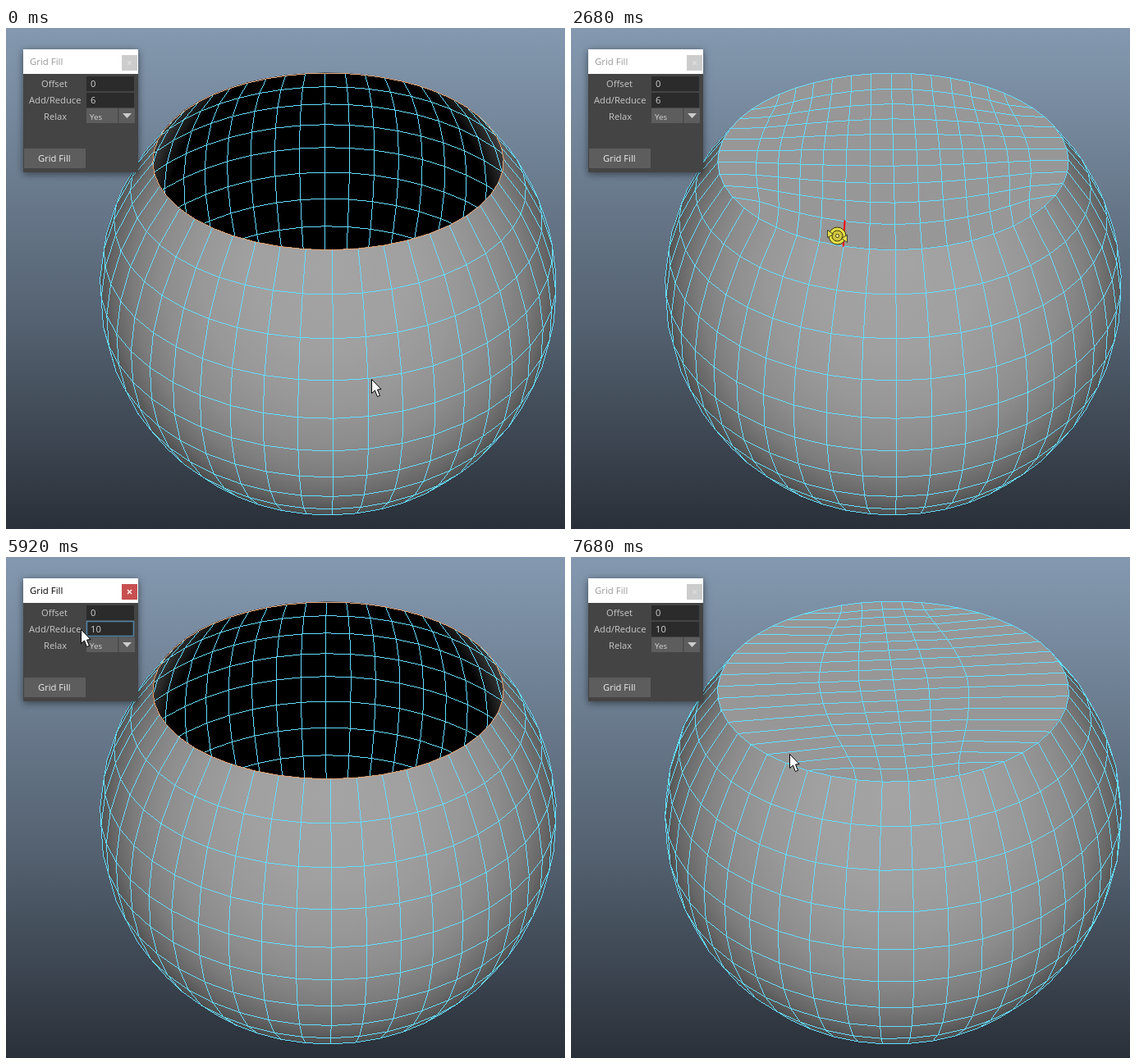
Recreate the animation shown at these times as an HTML page with a canvas. Size 681 px wide and 611 px high, loop 8000 ms.

```html
<!DOCTYPE html>
<html lang="en">
<head>
<meta charset="utf-8">
<title>Grid fill</title>
<style>
html, body { margin: 0; width: 100%; height: 100%; overflow: hidden; background: #444 }
canvas { display: block }
</style>
</head>
<body>
<canvas id="stage" width="681" height="611"></canvas>
<script>
const g = document.getElementById('stage').getContext('2d');
const LOOP = 8000, RAD = Math.PI / 180;
const CX = 392, CY = 316, FOCAL = 1243, DIST = 4.58;   // perspective camera
const LONS = 48, LATS = 15, RIM = 45;
const CYAN = '#64dcff';
const FONT = '"Open Sans", "Noto Sans", sans-serif';

// Mouse moves: start, end, steps, control point, end point
const moves = [
  [80, 360, 4, 260, 250, 72, 146],
  [540, 540, 1, 72, 150, 73, 158],
  [1100, 1560, 6, 230, 400, 341, 170],
  [1660, 1940, 4, 557, 390, 330, 254],
  [2120, 2680, 7, 390, 252, 324, 251],
  [3330, 3600, 4, 230, 200, 136, 90],
  [4073, 4440, 5, 112, 90, 91, 88],
  [6013, 6300, 4, 85, 125, 79, 156],
  [6840, 7117, 4, 170, 190, 240, 235],
  [7210, 7580, 5, 253, 237, 266, 240]
];

const within = (t, ...spans) => spans.some(([a, b]) => t >= a && t < b);
const mix = (a, b, f) => a + (b - a) * f;
const mixPoints = (p, q, f) => p.map((v, c) => mix(v, q[c], f));

// Eased progress that advances in n hard steps between two times
function progress(t, start, end, n) {
  if (t < start) return 0;
  const gap = (end - start) / (n - 1) || 1;
  const f = Math.min(n, Math.floor((t - start + 1) / gap) + 1) / n;
  return f * f * (3 - 2 * f);
}

function mouseAt(t) {
  let at = [445, 428];
  for (const [start, end, n, cx, cy, ex, ey] of moves) {
    const f = progress(t, start, end, n), via = [cx, cy];
    at = mixPoints(mixPoints(at, via, f), mixPoints(via, [ex, ey], f), f);
  }
  return at;
}

function onSphere(lat, lon) {
  const r = Math.cos(lat * RAD);
  return [r * Math.sin(lon * RAD), Math.sin(lat * RAD), r * Math.cos(lon * RAD)];
}

// Quad grid inside the rim: a blend of front-to-back and side-to-side spans
function makeCap(add) {
  const cols = 26 - 2 * add, rows = 2 * add - 2;
  const rim = k => onSphere(RIM, k * 360 / LONS);
  const nearness = (i, n) => 1 - Math.abs(2 * i / n - 1);
  const grid = [];
  for (let j = 0; j <= rows; j++) {
    grid[j] = [];
    for (let i = 0; i <= cols; i++) {
      const k = i - cols / 2, side = cols / 2 + rows - j;
      const column = mixPoints(rim(LONS / 2 - k), rim(k), j / rows);
      const row = mixPoints(rim(-side), rim(side), i / cols);
      const u = nearness(i, cols), v = nearness(j, rows);
      grid[j][i] = !u ? row : !v ? column : mixPoints(column, row, .55 * v / (u + v));
    }
  }
  return grid;
}
const caps = { 6: makeCap(6), 10: makeCap(10) };

function projector(yaw, tilt) {
  const cy = Math.cos(yaw * RAD), sy = Math.sin(yaw * RAD);
  const ct = Math.cos(tilt * RAD), st = Math.sin(tilt * RAD);
  return ([x, y, z]) => {
    const px = x * cy + z * sy, pz = z * cy - x * sy;
    const s = FOCAL / (DIST - y * st - pz * ct);
    return [CX + px * s, CY - (y * ct - pz * st) * s];
  };
}

function polygon(points, path = new Path2D()) {
  points.forEach(([x, y], i) => i ? path.lineTo(x, y) : path.moveTo(x, y));
  path.closePath();
  return path;
}

function stroke(path, color, width = 1) {
  g.strokeStyle = color;
  g.lineWidth = width;
  g.stroke(path);
}

// One-pixel line without smoothing, drawn as straight runs
function pixelLine(a, b) {
  const flat = Math.abs(b[0] - a[0]) >= Math.abs(b[1] - a[1]);
  const m = flat ? 0 : 1;
  if (a[m] > b[m]) [a, b] = [b, a];
  const from = Math.round(a[m]), to = Math.round(b[m]);
  const slope = (b[1 - m] - a[1 - m]) / (b[m] - a[m] || 1);
  const level = p => Math.round(a[1 - m] + (p - a[m]) * slope);
  for (let start = from, p = from + 1; p <= to + 1; p++) {
    const cross = level(start);
    if (p <= to && level(p) == cross) continue;
    if (flat) g.fillRect(start, cross, p - start, 1);
    else g.fillRect(cross, start, 1, p - start);
    start = p;
  }
}

function outline(points, color) {
  g.fillStyle = color;
  points.forEach((p, i) => pixelLine(p, points[(i + 1) % points.length]));
}

function gradient(grad, stops) {
  for (const [at, color] of stops) grad.addColorStop(at, color);
  return grad;
}
const grey = v => `rgb(${v},${v},${v})`;
const skyFill = gradient(g.createLinearGradient(0, 0, 0, 611),
  [[0, '#8499b0'], [.6, '#53606f'], [1, '#2a3039']]);
const bodyFill = gradient(g.createRadialGradient(396, 288, 0, 394, 312, 284),
  [[0, 164], [.35, 160], [.55, 152], [.72, 140], [.84, 124], [.93, 102], [1, 74]].map(([a, v]) => [a, grey(v)]));
const holeFill = gradient(g.createRadialGradient(392, 235, 0, 392, 235, 234),
  [[0, '#000'], [.84, '#000'], [1, '#484848']]);

function segmentDistance([px, py], [ax, ay], [bx, by]) {
  const dx = bx - ax, dy = by - ay;
  const f = Math.max(0, Math.min(1, ((px - ax) * dx + (py - ay) * dy) / (dx * dx + dy * dy)));
  return Math.hypot(px - ax - f * dx, py - ay - f * dy);
}

function drawCap(cap, project, mouse) {
  const grid = cap.map(row => row.map(project));
  let best = 14, hot = null;
  const edge = (a, b) => {
    pixelLine(a, b);
    const d = mouse ? segmentDistance(mouse, a, b) : 99;
    if (d < best) { best = d; hot = [a, b]; }
  };
  g.fillStyle = CYAN;
  grid.forEach((row, j) => row.forEach((p, i) => {
    if (i) edge(row[i - 1], p);
    if (j) edge(grid[j - 1][i], p);
  }));
  if (hot) stroke(polygon(hot), '#f00', 2);
}

function drawMesh(project, cap, mouse) {
  const rings = [];
  for (let a = 0; a <= LATS; a++) {
    rings[a] = [];
    for (let b = 0; b < LONS; b++) rings[a][b] = project(onSphere(RIM - 9 * a, b * 360 / LONS));
  }
  const front = [], back = [], body = new Path2D();
  for (let a = 0; a < LATS; a++) {
    for (let b = 0; b < LONS; b++) {
      const n = (b + 1) % LONS;
      const q = [rings[a][b], rings[a][n], rings[a + 1][n], rings[a + 1][b]];
      const area = (q[2][0] - q[0][0]) * (q[3][1] - q[1][1]) - (q[2][1] - q[0][1]) * (q[3][0] - q[1][0]);
      (area > 0 ? front : back).push(q);
    }
  }
  front.forEach(q => polygon(q, body));
  const rim = polygon(rings[0]);
  g.fillStyle = bodyFill;
  g.fill(body);
  g.fillStyle = cap ? '#979797' : holeFill;
  g.fill(rim);
  if (!cap) {
    g.save();
    g.clip(rim);
    back.forEach(q => outline(q, CYAN));
    g.restore();
  }
  front.forEach(q => outline(q, CYAN));
  if (cap) drawCap(cap, project, mouse);
  else outline(rings[0], '#e2a170');
}

function box(x, y, w, h, color) {
  g.fillStyle = color;
  g.fillRect(x, y, w, h);
}

function text(str, x, y, color = '#c8c8c8', size = 11.2) {
  g.font = `${size}px ${FONT}`;
  g.fillStyle = color;
  g.fillText(str, x, y);
}

function field(value, y, focused, selected, caret) {
  box(98, y, 58, 18, '#2b2b2b');
  if (focused) {
    g.strokeStyle = '#5285a6';
    g.lineWidth = 1.5;
    g.strokeRect(98.5, y - .5, 57, 18);
  }
  if (selected) box(103, y + 2, 7, 13, '#5285a6');
  text(value, 103, y + 13, '#d2d2d2');
  const end = selected ? 103 : 103 + Math.round(g.measureText(value).width);
  if (caret) box(end, y + 2, 1.5, 13, '#ddd');
}

function drawPanel(t, hover) {
  const active = within(t, [820, 2120], [3980, 7210]);
  const caret = within(t, [820, 1350], [1880, 2120], [3980, 5000], [5280, 5920], [6480, 6990]);
  const pressed = within(t, [820, 1005], [6480, 6570]);
  g.save();
  g.shadowColor = 'rgba(0,0,0,.5)';
  g.shadowBlur = 9;
  g.shadowOffsetY = 2;
  box(21, 26, 140, 150, '#444');
  g.restore();
  box(21, 26, 140, 30, '#fff');
  text('Grid Fill', 29, 45, active ? '#000' : '#999', 11.4);
  box(141, 33, 19, 19, active ? '#c75050' : '#ccc');
  g.strokeStyle = active ? '#fff' : '#ddd';
  g.lineWidth = 1.3;
  g.beginPath();
  g.moveTo(148, 40); g.lineTo(153, 45);
  g.moveTo(153, 40); g.lineTo(148, 45);
  g.stroke();

  text('Offset', 43, 72);
  text('Add/Reduce', 28, 92);
  text('Relax', 46, 112);
  field('0', 59, active && t < 3000, false, caret && t < 3000);
  field(t < 5280 ? '6' : t < 5360 ? '1' : '10', 79, active && t > 3000,
    within(t, [4250, 5280]), caret && t > 3000);

  box(98, 98, 59, 18, '#5d5d5d');
  box(136, 98, 1.5, 18, '#4a4a4a');
  text('Yes', 102, 112, '#d2d2d2', 9.8);
  g.fillStyle = '#ccc';
  g.fill(polygon([[142, 104], [153, 104], [147.5, 110]]));

  box(22, 147, 75, 24, pressed ? '#2b2b2b' : hover ? '#707070' : '#5d5d5d');
  text('Grid Fill', 39, 163, '#eee');
}

function drawArrow() {
  const shape = polygon([[0, 0], [0, 17], [4, 13.5], [6.8, 21], [10, 19.8], [7, 12.6], [11.5, 12]]);
  g.fillStyle = '#fff';
  g.fill(shape);
  stroke(shape, '#000');
}

function drawBeam() {
  const beam = new Path2D('M-3.5-7.5h3M.5-7.5h3M0-7V7M-3.5 7.5h3M.5 7.5h3');
  stroke(beam, '#ddd');
}

function drawOrbit() {
  g.translate(0, 2);
  const disc = (r, fill) => {
    const ring = new Path2D();
    ring.arc(0, 0, r, 0, 7);
    g.fillStyle = fill;
    g.fill(ring);
    stroke(ring, '#38350a');
  };
  const tips = polygon([[-12, -7], [-12, 2], [-5, -2]]);
  tips.addPath(polygon([[12, 8], [12, -1], [5, 3]]));
  disc(10.5, '#e6de45');
  disc(6.5, '#cfc63c');
  g.fillStyle = '#e6de45';
  g.fill(tips);
  stroke(tips, '#222', .8);
  disc(2, '#fff9a0');
}

function draw(t) {
  const mouse = mouseAt(t), [mx, my] = mouse;
  const swing = progress(t, 2120, 2680, 7), turn = progress(t, 7210, 7580, 5);
  const yaw = 1.1 - .4 * swing + 4 * Math.sin(Math.PI * swing) + 3.7 * turn;
  const cap = within(t, [1005, 3240]) ? caps[6] : t >= 6570 ? caps[10] : null;
  const picking = within(t, [1100, 2860], [6930, 7680]);

  g.fillStyle = skyFill;
  g.fillRect(0, 0, 681, 611);
  g.lineJoin = 'round';
  drawMesh(projector(yaw, 37.4 + .6 * turn), cap, picking && mouse);
  drawPanel(t, mx > 22 && mx < 97 && my > 147 && my < 171);

  const inField = mx > 98 && mx < 156 && my > 59 && my < 97;
  g.save();
  g.translate(Math.round(mx) + .5, Math.round(my) + .5);
  if (within(t, [2120, 2860], [7210, 7680])) drawOrbit();
  else if (inField) drawBeam();
  else drawArrow();
  g.restore();
}

function frame() {
  draw(performance.now() % LOOP);
  requestAnimationFrame(frame);
}
frame();
</script>
</body>
</html>
```
